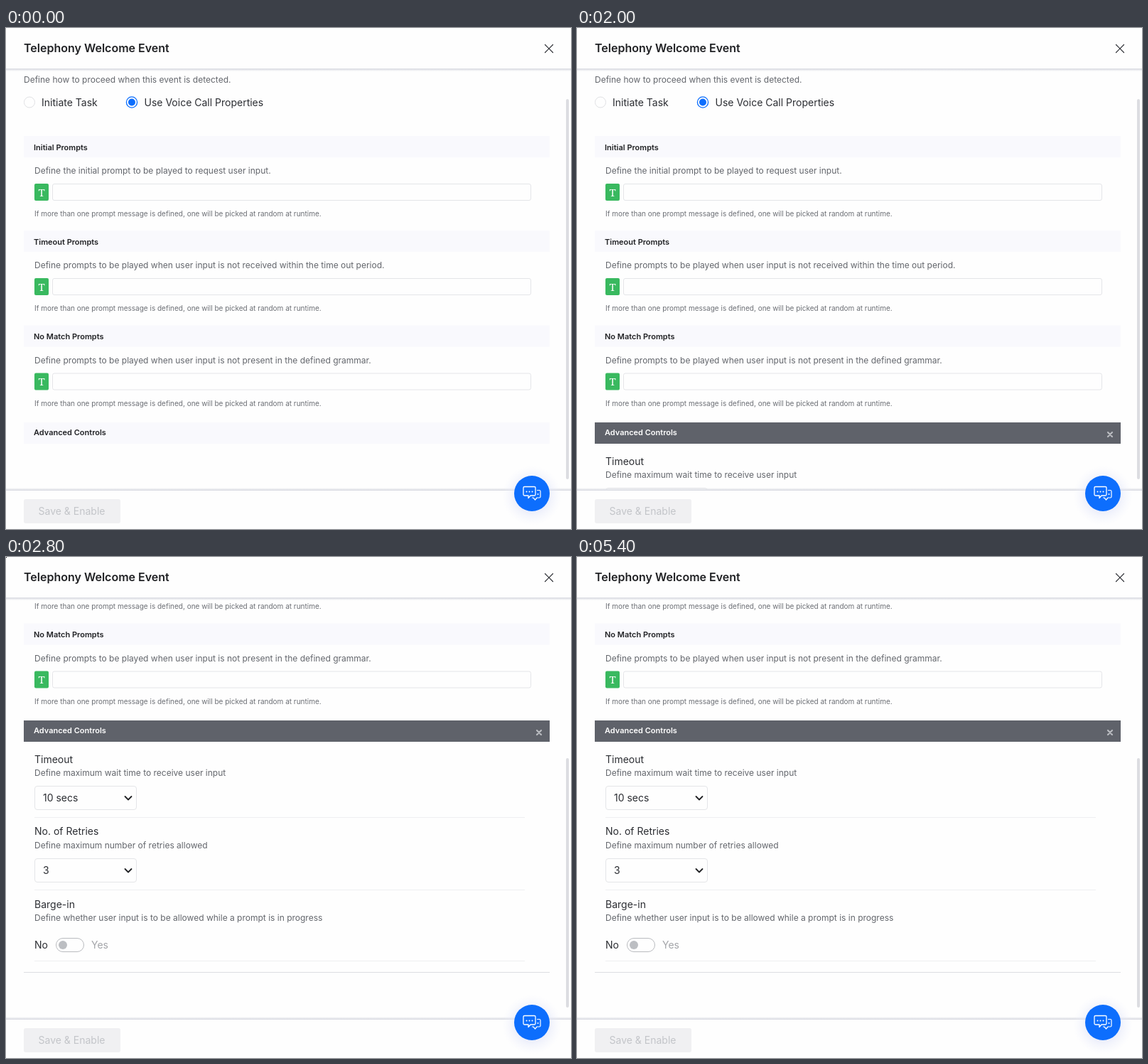
Animation of 795x705 px, one loop 5600 ms. Source, as an HTML page:

```html
<!DOCTYPE html>
<html lang="en">
<head>
<meta charset="utf-8">
<title>Welcome event settings</title>
<style>
  html, body { margin: 0; width: 100%; height: 100%; overflow: hidden; background: #fefefe; }
  svg { display: block; width: 795px; height: 705px; font-family: Inter, sans-serif; }
  text { white-space: pre; }
  .title { font-size: 16px; font-weight: 600; fill: #202124; }
  .label { font-size: 14px; fill: #2c2e33; }
  .desc { font-size: 12px; fill: #63666c; }
  .hint { font-size: 10px; fill: #6c6f75; }
  .head { font-size: 11px; font-weight: 600; fill: #202124; }
  .muted { font-size: 14px; fill: #a3a5a9; }
  .off { font-size: 14px; fill: #c3c5c9; }
  .box { fill: #fefefe; stroke: #e4e5e8; }
  .badge { font: 15px "Noto Serif", serif; fill: #fff; text-anchor: middle; }
  .stroke { fill: none; stroke-linecap: round; stroke-linejoin: round; }
</style>
</head>
<body>
<svg id="stage" viewBox="0 0 795 705"></svg>
<script>
const LOOP = 5600;
const SCROLL = 325;

const text = (kind, x, y, content) => `<text class="${kind}" x="${x}" y="${y}">${content}</text>`;
const rect = (x, y, w, h, attrs) => `<rect x="${x}" y="${y}" width="${w}" height="${h}" ${attrs}/>`;
const line = (x1, x2, y, color) => rect(x1, y, x2 - x1, 1, `fill="${color}"`);
const path = (d, color, width) =>
  `<path class="stroke" d="${d}" stroke="${color}" stroke-width="${width}"/>`;
const circle = (x, y, r, attrs) => `<circle cx="${x}" cy="${y}" r="${r}" ${attrs}/>`;

function promptSection(top, title, description) {
  return rect(25, top, 740, 30, 'fill="#f9f9fd"') +
    text('head', 39, top + 19.5, title) +
    text('desc', 40, top + 53, description) +
    rect(40, top + 67, 20, 24, 'rx="2" fill="#39b95f"') +
    text('badge', 50, top + 84.5, 'T') +
    rect(65.5, top + 67.5, 673, 23, 'rx="2.5" class="box"') +
    text('hint', 40, top + 113,
      'If more than one prompt message is defined, one will be picked at random at runtime.');
}

function setting(top, title, description) {
  return text('label', 40, top, title) + text('desc', 40, top + 18.5, description);
}

function select(top, value) {
  return rect(40.5, top + .5, 143, 33, 'rx="3.5" class="box"') +
    text('label', 52, top + 22, value) +
    path(`M167.5 ${top + 15}l4.5 4.5 4.5-4.5`, '#202124', 1.8);
}

const content =
  text('desc', 25, 76.5, 'Define how to proceed when this event is detected.') +
  circle(33, 104.5, 7.5, 'fill="#fefefe" stroke="#e0e1e4"') +
  text('label', 50, 110, 'Initiate Task') +
  circle(177, 104.5, 7.6, 'fill="#fefefe" stroke="#0d6efd" stroke-width="1.3"') +
  circle(177, 104.5, 5, 'fill="#0d6efd"') +
  text('label', 194.5, 110, 'Use Voice Call Properties') +
  promptSection(152, 'Initial Prompts',
    'Define the initial prompt to be played to request user input.') +
  promptSection(285, 'Timeout Prompts',
    'Define prompts to be played when user input is not received within the time out period.') +
  promptSection(418.5, 'No Match Prompts',
    'Define prompts to be played when user input is not present in the defined grammar.') +
  rect(25, 555, 740, 30, 'id="bar"') +
  '<text id="barTitle" class="head" x="39" y="573">Advanced Controls</text>';

const advanced =
  path('M747 569l6 6m0-6l-6 6', '#b9bbc0', 2.2) +
  `<g transform="translate(0 ${SCROLL})">` +
  setting(289.5, 'Timeout', 'Define maximum wait time to receive user input') +
  select(322, '10 secs') +
  line(40, 730, 366, '#eeeff1') +
  setting(391, 'No. of Retries', 'Define maximum number of retries allowed') +
  select(424, '3') +
  line(40, 730, 468, '#eeeff1') +
  setting(493.5, 'Barge-in', 'Define whether user input is to be allowed while a prompt is in progress') +
  text('label', 40, 551, 'No') +
  rect(70.5, 536.5, 39, 19, 'rx="9.5" fill="#fefefe" stroke="#b9bbbf"') +
  circle(80, 546, 6, 'fill="#bcbec2"') +
  text('muted', 120, 551, 'Yes') +
  line(40, 730, 568, '#eeeff1') +
  line(25, 765, 584, '#dddee2') +
  '</g>';

const chatButton =
  circle(740, 658, 42, 'fill="url(#halo)"') +
  circle(740, 655, 25, 'fill="#0d6efd"') +
  path('M729.5 645.5h14q1.5 0 1.5 1.5v9.500q0 1.5-1.500 1.500h-5.500l-3 3.500v-3.500h-5.500q-1.500 0-1.500-1.500v-9.500q0-1.500 1.500-1.500z',
    '#fff', 1.3) +
  path('M747.500 650.500h3q1.500 0 1.500 1.500v7.500q0 1.500-1.500 1.500h-3.500l-2.500 3-2.500-3h-1.500', '#fff', 1.2) +
  [732.5, 736.5, 740.5].map(x => circle(x, 652.5, 1, 'fill="#fff"')).join('') +
  circle(748.5, 656, 1, 'fill="#fff"');

const stage = document.getElementById('stage');
stage.innerHTML = `
  <defs>
    <clipPath id="view"><rect y="59" width="795" height="590"/></clipPath>
    <linearGradient id="below" x2="0" y2="1">
      <stop stop-color="#d5d7df"/><stop offset="1" stop-color="#d5d7df" stop-opacity="0"/>
    </linearGradient>
    <linearGradient id="above" x2="0" y2="1">
      <stop stop-color="#d5d7df" stop-opacity="0"/><stop offset="1" stop-color="#d5d7df"/>
    </linearGradient>
    <radialGradient id="halo">
      <stop offset=".55" stop-color="#dfe3f8" stop-opacity=".55"/>
      <stop offset="1" stop-color="#eef0fb" stop-opacity="0"/>
    </radialGradient>
  </defs>
  ${rect(0, 0, 795, 705, 'fill="#fefefe"')}
  <g clip-path="url(#view)"><g id="content">${content}<g id="advanced">${advanced}</g></g></g>
  ${rect(788, 100, 4, 535, 'id="thumb" rx="2" fill="#dcdde1"')}
  ${rect(0, 57, 795, 4, 'fill="url(#below)"')}
  ${text('title', 25, 33.5, 'Telephony Welcome Event')}
  ${path('M758.5 23.500l11 11m0-11l-11 11', '#303238', 1.2)}
  ${rect(0, 650, 795, 55, 'fill="#fefefe"')}
  ${rect(0, 647, 795, 4, 'fill="url(#above)"')}
  ${rect(25, 663, 136, 34, 'rx="3" fill="#f0f0f2"')}
  ${text('off', 45.5, 685, 'Save &amp; Enable')}
  ${chatButton}
  ${rect(0, 0, 1, 1, 'id="corner" fill="#000"')}`;

const part = id => document.getElementById(id);
const show = (id, visible) => part(id).setAttribute('visibility', visible ? 'visible' : 'hidden');
const between = (t, from, to) => t >= from && t < to;

function draw(t) {
  const open = t >= 2000;
  const scrolled = t >= 2800;
  const [thumbTop, thumbHeight] = scrolled ? [283, 351] : t >= 2400 ? [85, 351] : [100, 535];

  show('advanced', open);
  part('bar').setAttribute('fill', open ? '#5f626a' : '#f9f9fd');
  part('barTitle').style.fill = open ? '#fff' : '';
  part('content').setAttribute('transform', `translate(0 ${scrolled ? -SCROLL : 0})`);
  part('thumb').setAttribute('y', thumbTop);
  part('thumb').setAttribute('height', thumbHeight);
  show('corner', between(t, 400, 2000) || between(t, 2600, 4400));
}

const start = performance.now();
function tick() {
  draw((performance.now() - start) % LOOP);
  requestAnimationFrame(tick);
}
tick();
</script>
</body>
</html>
```
